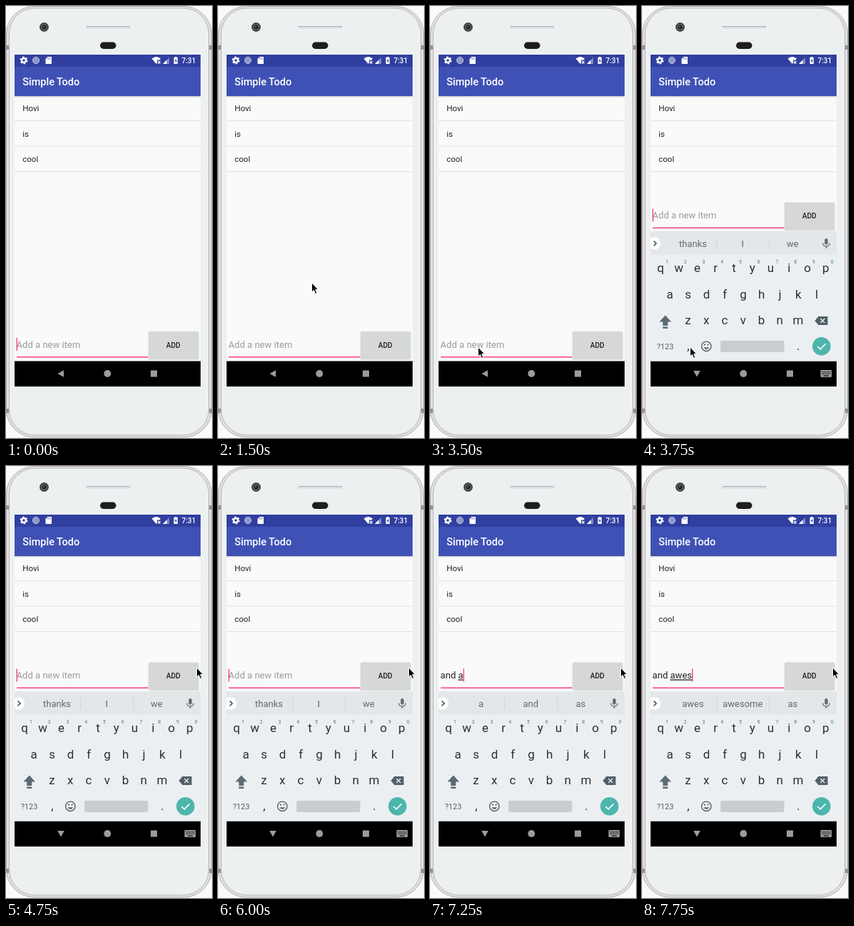
These frames come from a looping animation (289 px wide and 604 px high, 8000 ms). An HTML page:

```html
<!DOCTYPE html>
<html lang="en">
<head>
<meta charset="utf-8">
<title>Todo list demo</title>
<style>
  html, body { margin: 0; width: 100%; height: 100%; overflow: hidden; background: #fafafa; }
  svg { display: block; width: 289px; height: 604px; font-family: Roboto, sans-serif; }
  .mid { text-anchor: middle; }
  .item { font-size: 11.6px; fill: #212121; }
  .field { font-size: 13.05px; white-space: pre; }
  .key { font-size: 17px; fill: #263238; }
  .digit { font-size: 7px; fill: #607078; }
  .suggestion { font-size: 13px; fill: #5f6b71; }
</style>
</head>
<body>
<svg viewBox="0 0 289 604">
  <!-- phone body -->
  <rect x=".5" y=".5" width="288" height="602.5" rx="39" fill="#e2dfe2" stroke="#b3adb2"/>
  <rect x="4.5" y="3" width="280" height="597" rx="36" fill="#ecf0f1" stroke="#b9b4b9"/>
  <path d="M0 58H4M285 58H289M0 566H4M285 566H289" stroke="#969196" stroke-width="6"/>
  <circle cx="53.5" cy="29.5" r="6.5" fill="#454547"/>
  <circle cx="53.5" cy="29.5" r="3.6" fill="#1c1c1f" stroke="#77777a"/>
  <circle cx="53" cy="29" r="1" fill="#8a8a90"/>
  <rect x="112" y="28" width="63" height="3.6" rx="1.8" fill="#dcdce0"/>
  <path d="M113 28.5H174" stroke="#b3b1b6"/>
  <rect x="132" y="50.5" width="22.5" height="9.5" rx="4.7" fill="#1d1d1f"/>

  <!-- screen -->
  <path fill="#fafafa" d="M12 68H273V532H12Z"/>
  <path fill="#303f9f" d="M12 68H273V85H12Z"/>
  <path fill="#d4d5da" d="M12 126H273V127H12Z"/>
  <path fill="#ececee" d="M12 127H273V128H12Z"/>
  <path fill="#3f51b5" d="M12 85H273V126H12Z"/>
  <g fill="#fff">
    <circle cx="25" cy="76" r="3" fill="none" stroke="#fff" stroke-width="2.4"/>
    <circle cx="25" cy="76" r="4.7" fill="none" stroke="#fff" stroke-width="1.6" stroke-dasharray="2.5 2.42"/>
    <circle cx="42" cy="76" r="4.6" fill="#8f99cd" stroke="#b7bde0"/>
    <path d="M58.5 71H64V81H55.5V74Z"/>
    <path d="M58.3 72.5V74.5M60.2 72.5V74.5M62.1 72.5V74.5" stroke="#303f9f" stroke-width=".8"/>
    <path d="M204.5 73.5Q211 68.5 217 73.5L215.5 75.5H212V79.5L210.8 81Z"/>
    <path d="M213 77L216.5 80.5M216.5 77L213 80.5" stroke="#fff" stroke-width="1.1"/>
    <path d="M220 81L229 72V81Z" opacity=".4"/>
    <path d="M220 81L225.5 75.5V81Z"/>
    <path d="M235.5 72H236.8V71H239.5V72H240.8V81H235.5Z"/>
    <path d="M238.7 73.2L236.7 77H237.9V79.8L239.8 76H238.6Z" fill="#303f9f"/>
    <text x="246.4" y="80" font-size="10.1" font-weight="500">7:31</text>
    <text x="23.2" y="110.7" font-size="14.5" font-weight="500">Simple Todo</text>
  </g>
  <g class="item">
    <text x="23.2" y="147.3">Hovi</text>
    <text x="23.2" y="182.8">is</text>
    <text x="23.2" y="218.3">cool</text>
  </g>
  <path d="M12 160.5H273M12 196H273M12 231.5H273" stroke="#e2e2e2"/>

  <!-- entry row -->
  <g id="entry">
    <path d="M15 490.8H200" stroke="#ff4081" stroke-width="1.5"/>
    <rect x="199.5" y="455.5" width="71.5" height="39.5" rx="2" fill="#e3e3e3"/>
    <rect x="200" y="455" width="70" height="38.8" rx="1.5" fill="#d6d7d7"/>
    <text class="mid" x="234.7" y="478" font-size="10.15" font-weight="500" fill="#212121">ADD</text>
    <text class="field" id="hint" x="14.6" y="478" fill="#9b9b9b">Add a new item</text>
    <text class="field" id="typed" x="14.6" y="478" fill="#212121"><tspan id="done"></tspan><tspan id="word" text-decoration="underline"></tspan></text>
    <path id="caret" d="M0 464V482" stroke="#ff4081" stroke-width="1.4"/>
  </g>

  <!-- navigation bar -->
  <path fill="#000" d="M12 496.5H273V532H12Z"/>
  <g fill="#9c9c9c">
    <path id="back" d="M72.5 514L81 509.2V518.8Z"/>
    <circle cx="142.3" cy="514" r="4.9"/>
    <rect x="203" y="509.5" width="9" height="9" rx=".6"/>
  </g>

  <g id="keyboard">
    <path fill="#eceff1" d="M12 315H273V496.5H12Z"/>
    <path fill="#e4e7e9" d="M12 315H273V347.5H12Z"/>
    <path d="M104.8 324V341M178.8 324V341" stroke="#cdd2d5"/>
    <path d="M12 325A8.8 8.8 0 1 1 12 339Z" fill="#fff"/>
    <path d="M16.5 328.5L20 332L16.5 335.5" fill="none" stroke="#37474f" stroke-width="1.5"/>
    <g class="suggestion mid" id="suggestions">
      <text x="71.5" y="337"/><text x="141.3" y="337"/><text x="211.3" y="337"/>
    </g>
    <rect x="256.3" y="325" width="4.4" height="8.6" rx="2.2" fill="#5f6b71"/>
    <path d="M253.8 331.5A4.7 4.7 0 0 0 263.2 331.5M258.5 336V339" fill="none" stroke="#5f6b71" stroke-width="1.3"/>
    <g id="keys" class="mid"></g>
    <path d="M32.7 432.5L41 441.5H36.2V447H29.2V441.5H24.4ZM29.2 448.6H36.2V451H29.2Z" fill="#5c6b73"/>
    <path d="M242.5 440L247.5 434H260.5V446H247.5Z" fill="#4f5e66"/>
    <path d="M250.3 437L256.3 443M256.3 437L250.3 443" stroke="#eceff1" stroke-width="1.4"/>
    <text class="mid" x="32.5" y="480" font-size="11" fill="#53626a">?123</text>
    <text class="mid key" x="65" y="481">,</text>
    <text class="mid key" x="219.3" y="481">.</text>
    <circle cx="90.3" cy="475.8" r="6.7" fill="none" stroke="#53626a" stroke-width="1.4"/>
    <path d="M86.6 477.2A3.9 3.9 0 0 0 94 477.2Z" fill="#53626a"/>
    <path d="M87 473.7H89M91.6 473.7H93.6" stroke="#53626a" stroke-width="1.8"/>
    <rect x="110" y="468" width="89.5" height="16" rx="2" fill="#c8cdd0"/>
    <circle cx="251.8" cy="475.8" r="12.8" fill="#4db6ac"/>
    <path d="M246.3 476L250.2 479.9L257.6 472.3" fill="none" stroke="#fff" stroke-width="1.6"/>
    <rect x="250.5" y="509" width="15.5" height="10" rx="1" fill="#9c9c9c"/>
    <path d="M252.5 511.7H264.5M252.5 514.2H264.5" stroke="#000" stroke-width="1.2" stroke-dasharray="1.3 .8"/>
    <path d="M254.5 517H262" stroke="#000" stroke-width="1.1"/>
  </g>

  <path id="mouse" d="M.5 1V14L3.4 11.3L5.6 16.4L7.8 15.5L5.6 10.4H9.6Z" fill="#000" stroke="#fff"/>
</svg>
<script>
const $ = id => document.getElementById(id);
const LOOP = 8000, KEYBOARD_AT = 3750;

// [start ms, x, y] of the pointer tip
const pointer = [
  [750, 115, 311], [1000, 129, 306], [1250, 140, 365], [1500, 131, 386],
  [1750, 107, 534], [2000, 112, 491], [2250, 110, 482], [3000, 96, 482],
  [3250, 66, 477], [3500, 67, 476], [4500, 267, 281]
];

// [start ms, finished text, word being composed, suggestions]
const typing = [
  [0, '', '', 'thanks I we'],
  [6500, '', 'a', 'a I and'],
  [6750, '', 'and', 'and Jorven an'],
  [7000, 'and ', '', 'I the you'],
  [7250, 'and ', 'a', 'a and as'],
  [7500, 'and ', 'aw', 'aw away as'],
  [7750, 'and ', 'awes', 'awes awesome as']
];

// caret flips at each of these times, starting visible
const blinks = [250, 750, 1250, 1750, 2250, 2750, 3250, 3750, 4250, 4750, 5500, 6000];

const latest = (steps, t) => steps.filter(step => step[0] <= t).pop();

function addText(x, y, className, text) {
  const node = document.createElementNS('http://www.w3.org/2000/svg', 'text');
  node.setAttribute('x', x);
  node.setAttribute('y', y);
  node.setAttribute('class', className);
  node.textContent = text;
  $('keys').append(node);
}

[['qwertyuiop', 26, 372], ['asdfghjkl', 39, 408.5], ['zxcvbnm', 64.5, 445.3]].forEach(([row, x0, y], r) =>
  [...row].forEach((letter, i) => {
    const x = x0 + i * 25.75;
    addText(x, y, 'key', letter);
    if (r === 0) addText(x + 9, 360, 'digit', (i + 1) % 10);
  }));

function draw(t) {
  const open = t >= KEYBOARD_AT;
  $('keyboard').style.display = open ? '' : 'none';
  $('entry').setAttribute('transform', `translate(0 ${open ? -180.6 : 0})`);
  $('back').setAttribute('transform', open ? 'rotate(-90 77 514)' : '');

  const [, done, word, suggestions] = latest(typing, t);
  $('done').textContent = done;
  $('word').textContent = word;
  $('hint').style.display = done + word ? 'none' : '';
  suggestions.split(' ').forEach((text, i) => $('suggestions').children[i].textContent = text);

  const width = done + word ? $('typed').getComputedTextLength() : 0;
  $('caret').setAttribute('transform', `translate(${15.3 + width} 0)`);
  $('caret').style.display = blinks.filter(b => b <= t).length % 2 ? 'none' : '';

  const spot = latest(pointer, t);
  $('mouse').style.display = spot ? '' : 'none';
  if (spot) $('mouse').setAttribute('transform', `translate(${spot[1]} ${spot[2]})`);
}

function tick() {
  draw(performance.now() % LOOP);
  requestAnimationFrame(tick);
}
tick();
</script>
</body>
</html>
```
